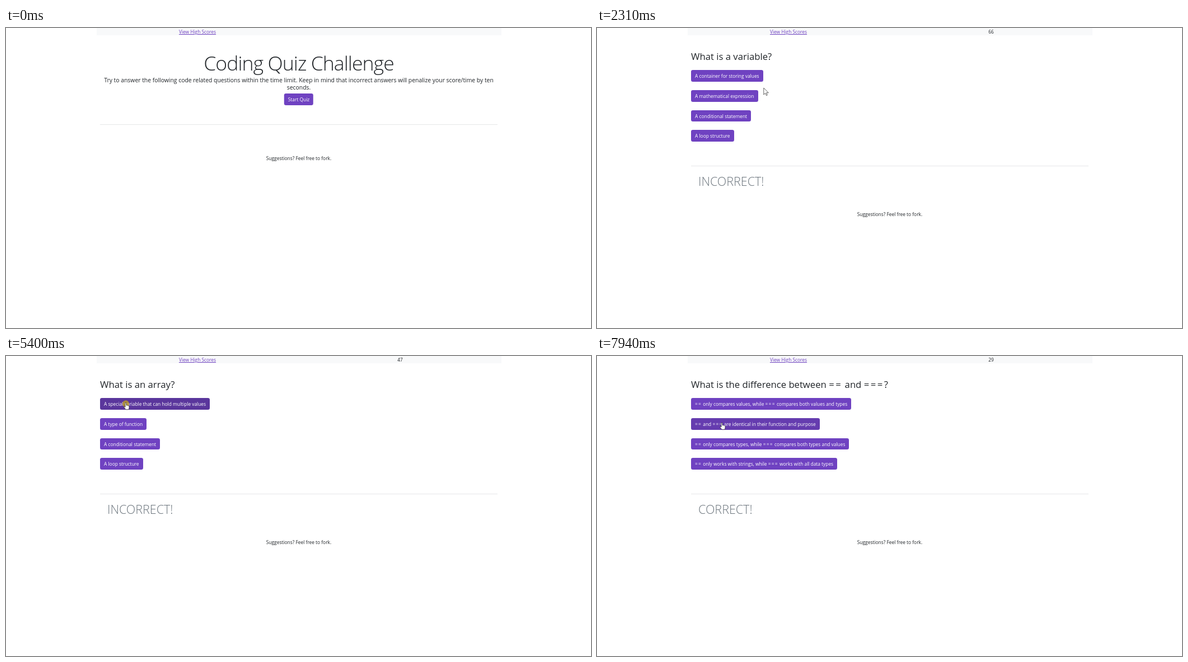
An HTML page that plays this animation: 1045 px wide and 536 px high, repeating every 8000 ms.

```html
<!DOCTYPE html>
<html lang="en">
<head>
<meta charset="utf-8">
<title>Coding Quiz</title>
<style>
  html, body { margin: 0; width: 100%; height: 100%; overflow: hidden; background: #fff; }
  #stage {
    position: relative; width: 1045px; height: 536px; overflow: hidden;
    font: 8.39px/12px "Open Sans", "Noto Sans", sans-serif; color: #212529; white-space: nowrap;
  }
  #stage > * { position: absolute; }
  .mid { transform: translateX(-50%); text-align: center; }
  #bar { left: 162px; top: 0; width: 723px; height: 13px; background: #f8f9fa; }
  #scores { left: 342px; top: 1px; color: #6f42c1; text-decoration: underline; }
  #timer { left: 704px; top: 1px; }
  #title { left: 523px; top: 41.5px; font-size: 35.6px; line-height: 40px; font-weight: 300; letter-spacing: -.95px; }
  #lead { left: 523px; top: 86.6px; font-size: 10.38px; line-height: 13.2px; }
  #question { left: 168px; top: 40.5px; font-size: 16.7px; line-height: 20px; }
  .btn {
    box-sizing: border-box; height: 20.8px; padding: 0 7px; line-height: 21.2px;
    border-radius: 3.3px; background: #6f42c1; color: #fff;
  }
  .op { letter-spacing: .15em; }
  #rule { left: 168px; width: 710px; height: 1px; background: #e6e7e8; }
  #note { left: 181px; top: 262.3px; font-size: 21.5px; line-height: 24px; font-weight: 300; color: #6c757d; }
  #footer { left: 523px; }
  #ring { width: 12px; height: 12px; margin: -4px 0 0 -6px; border-radius: 50%; background: rgba(220, 190, 0, .6); }
  #cursor { left: 0; top: 0; overflow: visible; }
  #cursor path { fill: #fff; stroke: #222; stroke-width: .7; stroke-linejoin: round; }
</style>
</head>
<body>
<div id="stage">
  <div id="bar"></div>
  <div id="scores" class="mid">View High Scores</div>
  <div id="timer" class="mid"></div>
  <div id="title" class="mid">Coding Quiz Challenge</div>
  <div id="lead" class="mid">Try to answer the following code related questions within the time limit. Keep in mind that incorrect answers will penalize your score/time by ten<br>seconds.</div>
  <div id="question"></div>
  <div id="rule"></div>
  <div id="note"></div>
  <div id="footer" class="mid">Suggestions? Feel free to fork.</div>
  <div id="ring"></div>
  <svg id="cursor" width="12" height="16">
    <path id="arrow" d="M0 0V12L2.8 9.4L4.7 13.6L6.5 12.8L4.7 8.7H8.5Z"/>
    <path id="hand" d="M-1 1Q0 -.6 1 1V5Q2 4.2 2.8 5.2Q3.8 4.5 4.5 5.6Q6 5.2 6 6.8V9.5Q5.8 11 5 12.5H0L-3 8.6Q-3.6 7 -2.2 7L-1 8.2Z"/>
  </svg>
</div>
<script>
const LOOP = 8000, ENTER = 100, TRAVEL = 340, FADE = 150, CLICK = 100;
const FIRST_TICK = 2170, TICK = 1030, START_SECONDS = 75;
const $ = id => document.getElementById(id);
const rowTop = row => 75.2 + 35.65 * row;
const clamp = v => Math.max(0, Math.min(1, v));
const lerp = (a, b, k) => a + (b - a) * k;
const smooth = u => u * u * (3 - 2 * u);

// at: screen appears; arrive: pointer reaches the picked row at x. Row 0 is always the right answer.
const scenes = [
  { at: 0, arrive: 870, travel: 770, pick: 0, x: 528, answers: ['Start Quiz'] },
  { at: 1070, arrive: 1550, pick: 1, x: 318, question: 'What is JavaScript?', answers: [
    'A programming language for web development', 'A markup language for web development',
    'A database management system', 'A browser extension'] },
  { at: 1830, arrive: 2520, pick: 0, x: 257, question: 'What is a variable?', answers: [
    'A container for storing values', 'A mathematical expression',
    'A conditional statement', 'A loop structure'] },
  { at: 3130, arrive: 3680, pick: 1, x: 219, question: 'What is a function?', answers: [
    'A set of instructions that performs a specific task', 'A type of variable',
    'A loop structure', 'An event listener'] },
  { at: 3810, arrive: 4700, travel: 830, pick: 3, x: 217, question: 'What is the DOM?', answers: [
    'The Document Object Model', 'The Desktop Object Manager',
    'The Database Object Model', 'The Digital Output Manager'] },
  { at: 4910, arrive: 5260, pick: 0, x: 214, question: 'What is an array?', answers: [
    'A special variable that can hold multiple values', 'A type of function',
    'A conditional statement', 'A loop structure'] },
  { at: 5470, arrive: 6080, pick: 2, x: 208, question: 'What is a loop?', answers: [
    'A block of code that is executed until a condition is met', 'A type of variable',
    'A conditional statement', 'An event listener'] },
  { at: 6290, arrive: 7190, pick: 0, x: 210, question: 'What is a boolean?', answers: [
    'A data type that can be either true or false', 'A type of function',
    'A loop structure', 'An event listener'] },
  { at: 7400, arrive: 7870, pick: 1, x: 223, question: 'What is the difference between == and ===?', answers: [
    '== only compares values, while === compares both values and types',
    '== and === are identical in their function and purpose',
    '== only compares types, while === compares both types and values',
    '== only works with strings, while === works with all data types'] }
];
scenes.forEach((scene, i) => {
  scene.y = i ? rowTop(scene.pick) + 8 : 131;
  scene.from = i ? scenes[i - 1] : { x: 1010, y: 522 };
  scene.end = i + 1 < scenes.length ? scenes[i + 1].at : LOOP;
  scene.note = i < 2 ? '' : scene.from.pick === 0 ? 'CORRECT!' : 'INCORRECT!';
});
const sceneAt = t => scenes.filter(s => s.at <= t).pop();

let current, buttons = [];

function setText(el, text) {
  el.innerHTML = text.replace(/=+/g, '<span class="op">$&</span>');
}

function addButton(text, x, y, centred) {
  const b = document.createElement('div');
  b.className = centred ? 'btn mid' : 'btn';
  setText(b, text);
  b.style.left = x + 'px';
  b.style.top = y + 'px';
  $('stage').insertBefore(b, $('rule'));
  buttons.push(b);
}

function show(scene) {
  current = scene;
  buttons.forEach(b => b.remove());
  buttons = [];
  const intro = !scene.question;
  $('title').hidden = $('lead').hidden = !intro;
  setText($('question'), scene.question || '');
  $('note').textContent = scene.note;
  $('rule').style.top = (intro ? 172 : 246) + 'px';
  $('footer').style.top = (intro ? 226.7 : scene.note ? 327 : 300.7) + 'px';
  scene.answers.forEach((text, i) =>
    intro ? addButton(text, 523, 117, true) : addButton(text, 168, rowTop(i)));
}

// Each tick costs one second, or nine while the last answer was wrong.
function secondsLeft(t) {
  let left = START_SECONDS;
  for (let tick = FIRST_TICK; tick <= t; tick += TICK) {
    left -= sceneAt(tick).note === 'INCORRECT!' ? 9 : 1;
  }
  return left;
}

function isOver(b, x, y) {
  const left = b.offsetLeft - (b.classList.contains('mid') ? b.offsetWidth / 2 : 0);
  return x >= left && x <= left + b.offsetWidth && y >= b.offsetTop && y <= b.offsetTop + b.offsetHeight;
}

function shade(k) {
  return `rgb(${lerp(111, 89, k)},${lerp(66, 53, k)},${lerp(193, 154, k)})`;
}

function render(t) {
  const scene = sceneAt(t);
  if (scene !== current) show(scene);
  const { from, x: toX, y: toY, arrive, travel = TRAVEL, pick, end } = scene;

  $('timer').textContent = t < FIRST_TICK ? '' : secondsLeft(t);
  buttons[pick].style.background = shade(clamp((t - arrive) / FADE));
  $('ring').style.display = end < LOOP && t >= end - CLICK ? '' : 'none';
  $('cursor').style.display = t < ENTER ? 'none' : '';

  const k = smooth(clamp((t - arrive + travel) / travel));
  const x = lerp(from.x, toX, k), y = lerp(from.y, toY, k);
  const over = buttons.some(b => isOver(b, x, y));
  $('hand').style.display = over ? '' : 'none';
  $('arrow').style.display = over ? 'none' : '';
  $('cursor').style.transform = $('ring').style.transform = `translate(${x}px,${y}px)`;
}

const start = performance.now();
function frame() {
  render((performance.now() - start) % LOOP);
  requestAnimationFrame(frame);
}
frame();
</script>
</body>
</html>
```
